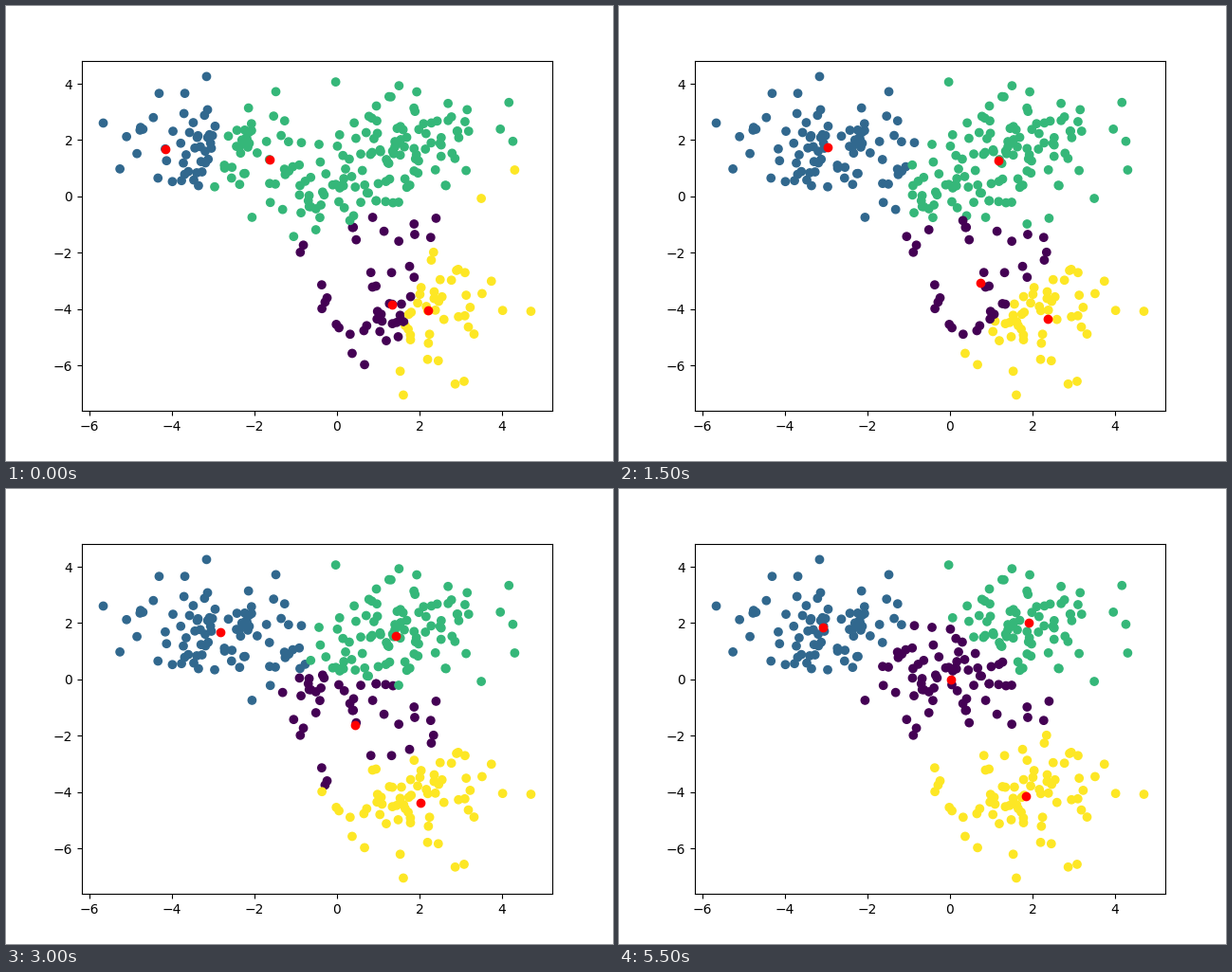
A matplotlib script that plays this animation: 640x480 px, repeating every 6 s.

```python
import numpy as np
import matplotlib.pyplot as plt
from matplotlib.animation import FuncAnimation

FRAMES, INTERVAL = 12, 500
BLOBS = [(0, 0), (2, 2), (-3, 2), (2, -4)]
SEEDS = [(1.34, -3.84), (-4.16, 1.68), (-1.63, 1.30), (2.21, -4.05)]


def make_points(per_blob=75):
    rng = np.random.RandomState(0)
    points = np.concatenate([rng.normal(blob, 1.0, (per_blob, 2)) for blob in BLOBS])
    order = np.arange(len(points))
    rng.shuffle(order)
    return points[order]


def distances(a, b):
    return np.linalg.norm(a[:, None] - b[None], axis=2)


def lloyd_steps(points, centers, count):
    """Return (centers, labels) for each step of k-means."""
    steps = []
    for _ in range(count):
        labels = distances(points, centers).argmin(axis=1)
        steps.append((centers, labels))
        centers = np.array([points[labels == k].mean(axis=0)
                            for k in range(len(centers))])
    return steps


points = make_points()
# Start from the data points closest to the chosen seeds.
start = points[distances(np.array(SEEDS), points).argmin(axis=1)]
steps = lloyd_steps(points, start, FRAMES)

fig, ax = plt.subplots(figsize=(6.4, 4.8), dpi=100)
dots = ax.scatter(*points.T, c=steps[0][1], cmap="viridis", vmin=0, vmax=3)
marks = ax.scatter(*start.T, c="r")


def update(i):
    centers, labels = steps[i]
    dots.set_array(labels)
    marks.set_offsets(centers)
    return dots, marks


anim = FuncAnimation(fig, update, frames=FRAMES, interval=INTERVAL,
                     repeat=True, repeat_delay=0)
plt.show()
```
